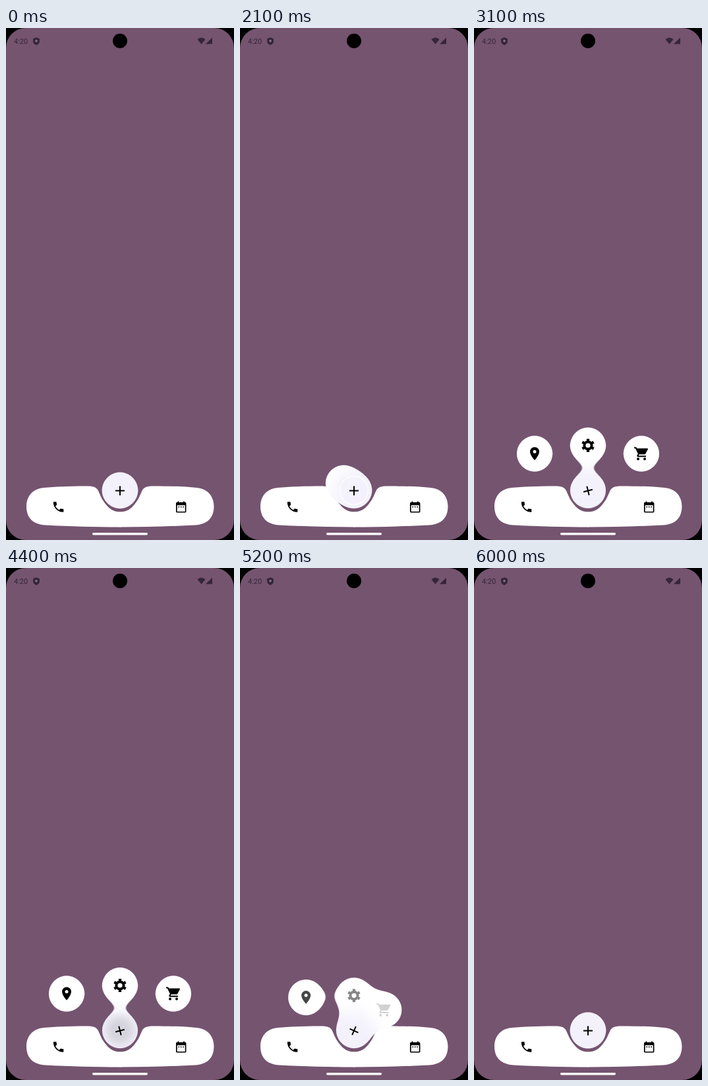
An HTML page that plays this animation: 346x774 px, repeating every 7600 ms.

```html
<!DOCTYPE html>
<html lang="en">
<head>
<meta charset="utf-8">
<title>Gooey action button</title>
<style>
  html, body { margin: 0; width: 100%; height: 100%; overflow: hidden; background: #000; }
  svg { display: block; width: 346px; height: 774px; }
  text { font: 11px Roboto, sans-serif; }
  .line { fill: none; stroke: #000; stroke-width: 2; }
</style>
</head>
<body>
<svg viewBox="0 0 346 774">
  <defs>
    <filter id="goo" filterUnits="userSpaceOnUse" x="0" y="550" width="346" height="224" color-interpolation-filters="sRGB">
      <feGaussianBlur stdDeviation="11.5"/>
      <feColorMatrix values="1 0 0 0 0  0 1 0 0 0  0 0 1 0 0  0 0 0 28 -13.5"/>
    </filter>
    <radialGradient id="ink">
      <stop offset=".4" stop-opacity=".12"/>
      <stop offset="1" stop-opacity="0"/>
    </radialGradient>
    <clipPath id="button"><circle cx="173" cy="699" r="27"/></clipPath>
  </defs>

  <rect width="346" height="774" rx="30" fill="#755470"/>

  <!-- status bar -->
  <g fill="#35263a">
    <text x="12" y="24">4:20</text>
    <path d="M46 14.3l5 1.9v3.4q0 4.600-5 6.400q-5-1.800-5-6.400v-3.400z"/>
    <path d="M290.5 17.2q6-5.400 12 0l-6 7.300z"/>
    <path d="M313 14.5v9.8h-10z"/>
  </g>
  <circle cx="46" cy="19.6" r="1.8" fill="#8d7089"/>
  <circle cx="173" cy="19.5" r="11"/>

  <!-- navigation bar: one half, mirrored -->
  <g fill="#fff" transform="translate(0 -.6)">
    <path id="half" d="M174 732H173C164 732 157 728 151 720C146 714 144 709 140 700C137 694 132 693 122 693
      C95 693 75 694 57 695.5C40 697 31 709 31 723.5C31 741 41 751 60 752C96 754 136 755 174 755Z"/>
    <use href="#half" transform="matrix(-1 0 0 1 346.5 0)"/>
  </g>
  <rect x="131" y="763" width="84" height="3.5" rx="1.75" fill="#fff"/>

  <path transform="translate(79.6 724) scale(.86)" d="M-9-8a1 1 0 0 1 1-1h3.5a1 1 0 0 1 1 1q0 1.9 .6 3.6q.2 .6-.3 1
    l-2.2 2.2A15 15 0 0 0 1.2 5.4l2.2-2.2q.4-.4 1-.3q1.700 .6 3.600 .6a1 1 0 0 1 1 1V8a1 1 0 0 1-1 1A17 17 0 0 1-9-8z"/>
  <g class="line" transform="translate(265.7 724) scale(.86)">
    <rect x="-8" y="-7" width="16" height="16" rx="1"/>
    <path d="M-8-5.5H8" stroke-width="5"/>
    <path d="M-5-10v3M5-10v3M-5 0h2m2 0h2m2 0h2"/>
  </g>

  <!-- gooey button and its children -->
  <g filter="url(#goo)" fill="#fff">
    <circle class="blob" r="29.45"/>
    <circle class="blob" r="29.45"/>
    <circle class="blob" r="29.45"/>
    <circle cx="173" cy="699" r="29.45" fill="#f3f1fb"/>
  </g>
  <circle id="ripple" cx="173" cy="699" fill="url(#ink)" clip-path="url(#button)"/>
  <circle id="ring" cx="173" cy="699" r="21.5" fill="none" stroke="#fff" stroke-width="1.2"/>
  <path id="plus" class="line" d="M-7 0H7M0-7V7"/>

  <g class="icon">
    <path d="M0 10Q-7 2-7-3a7 7 0 0 1 14 0Q7 2 0 10z"/>
    <circle cy="-3" r="2.5" fill="#fff"/>
  </g>
  <g class="icon">
    <circle class="line" r="5.6" style="stroke-width: 4"/>
    <circle class="line" r="8.4" style="stroke-width: 3.2" pathLength="6" stroke-dasharray=".46 .54" stroke-dashoffset=".23" transform="rotate(30)"/>
  </g>
  <g class="icon">
    <path d="M-7-8H9a1 1 0 0 1 .8 1.500L6 0.500Q5.500 1 4.500 1H-3z"/>
    <path class="line" d="M-11-9h2.600l4.400 9.200l-1.600 2.800q-.4 1 .8 1H7"/>
    <circle cx="-5" cy="8" r="2"/>
    <circle cx="5" cy="8" r="2"/>
  </g>
</svg>
<script>
const LOOP = 7600, OPEN = 1980, CLOSE = 4642, CLOSED = 5500;
const BUTTON = { x: 173, y: 699 };
const spread = [[-81, -55.5], [0, -68], [81, -55.5]];
const [ripple, ring, plus] = ['ripple', 'ring', 'plus'].map(id => document.getElementById(id));
const blobs = document.querySelectorAll('.blob');
const icons = document.querySelectorAll('.icon');

const clamp = x => Math.min(1, Math.max(0, x));
const smooth = x => x * x * (3 - 2 * x);
const snap = (t, step) => Math.floor(t / step) * step;

// Opening moves for 100 ms out of every 400; closing moves every 200 ms.
const openClock = t => snap(t, 400) + Math.min(100, snap(t % 400, 100));

// Children leave left to right and return right to left.
function travel(t, i) {
  if (t >= CLOSED) return 0;
  const out = smooth(clamp((openClock(t) - OPEN - i * 100) / 420));
  const back = clamp((snap(t, 200) - CLOSE - (2 - i) * 86) / 685) ** 4;
  return out - back;
}

// A press spreads from its start and vanishes on release.
function press(t, start, end, radius) {
  return t >= start && t < end ? Math.min(44, radius + (snap(t, 100) - start) * .15) : 0;
}

function draw() {
  const t = performance.now() % LOOP;
  const trips = spread.map((_, i) => travel(t, i));
  trips.forEach((p, i) => {
    const place = `translate(${BUTTON.x + spread[i][0] * p} ${BUTTON.y + spread[i][1] * p})`;
    blobs[i].setAttribute('transform', place);
    icons[i].setAttribute('transform', place);
    icons[i].setAttribute('opacity', p ** 3);
  });
  plus.setAttribute('transform', `translate(173 699.5) rotate(${76 * trips[2] ** 2})`);
  ripple.setAttribute('r', press(t, 1000, 1700, 14) || press(t, 4400, 4800, 30));
  ring.setAttribute('opacity', t >= 2000 && t < 2400 ? .9 : 0);
  requestAnimationFrame(draw);
}
draw();
</script>
</body>
</html>
```
